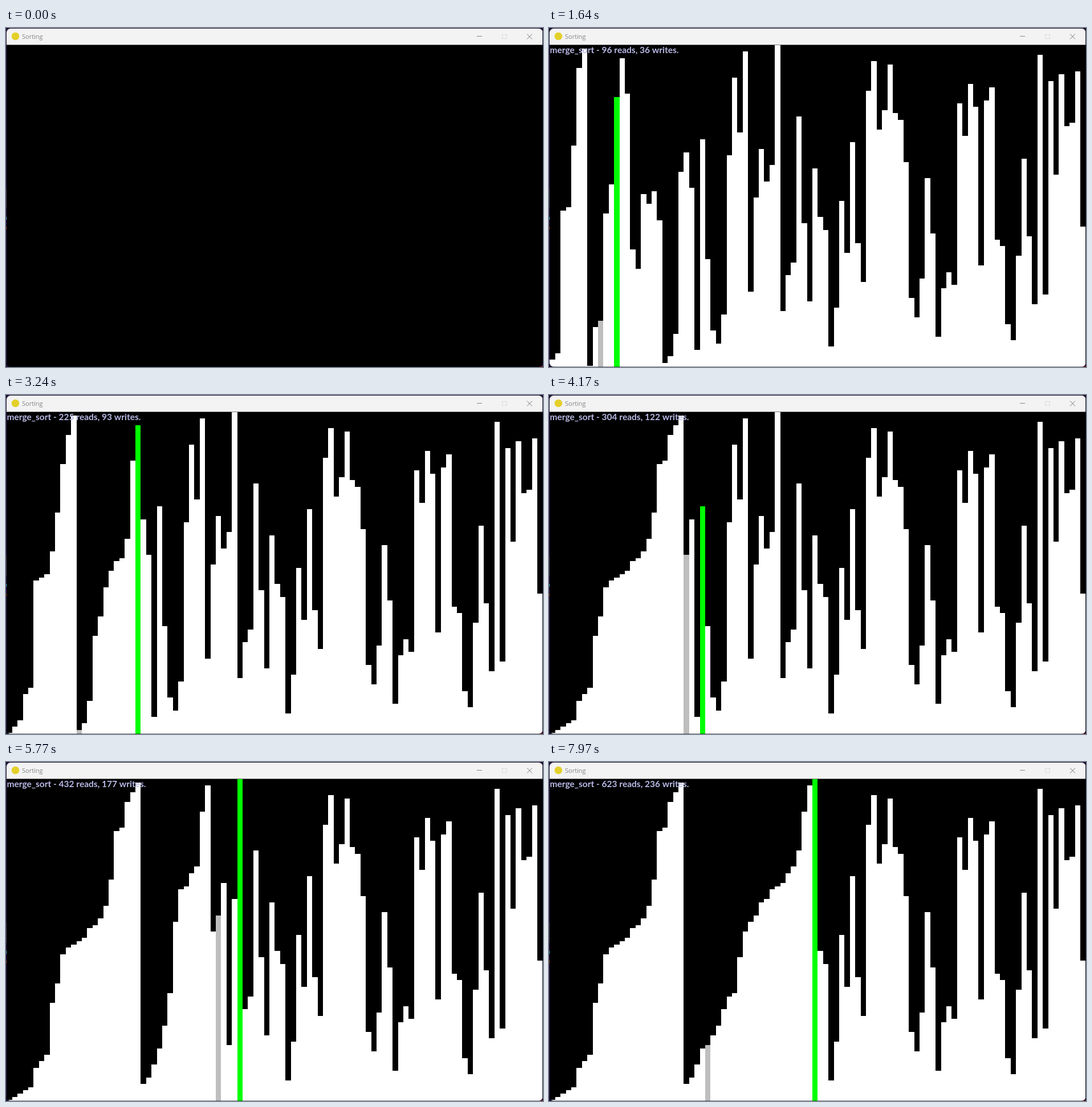
Animation of 942x594 px, one loop 8 s. Source, as an HTML page with a canvas:

```html
<!DOCTYPE html>
<html lang="en">
<head>
<meta charset="utf-8">
<title>Sorting</title>
<style>
  html, body { margin: 0; width: 100%; height: 100%; overflow: hidden; background: #1a1030; }
  canvas { display: block; }
</style>
</head>
<body>
<canvas id="stage" width="942" height="594"></canvas>
<script>
const ctx = document.getElementById('stage').getContext('2d');

const LOOP = 8000, START = 500, TICK = 200 / 3;
const BAR_WIDTH = 9.4, LEFT = 1.4, FLOOR = 592.4, UNIT = 5.68;

const initial = [
  68, 98, 48, 92, 4, 2, 49, 14, 0, 56, 47, 12, 83, 95, 84, 36, 30, 53, 50, 54,
  45, 1, 3, 10, 60, 66, 55, 5, 70, 33, 11, 7, 16, 65, 89, 72, 97, 23, 52, 67,
  57, 62, 99, 17, 28, 32, 77, 44, 20, 61, 46, 42, 6, 18, 51, 35, 69, 38, 26, 85,
  94, 73, 79, 93, 78, 76, 63, 21, 15, 27, 58, 41, 9, 24, 29, 25, 81, 71, 87, 80,
  31, 82, 86, 39, 37, 13, 8, 34, 64, 40, 19, 96, 22, 88, 59, 90, 74, 75, 91, 43
];

// Pace of the sort: [tick, array accesses so far]
const pace = [[0, 1], [6, 47], [27, 209], [55, 426], [68, 526], [92, 708], [112, 859]];

// Every read and write of the merge sort, in order
function recordSort(values) {
  const a = values.slice(), log = [];
  const read = i => { log.push({ index: i }); return a[i]; };
  const write = (i, value) => { log.push({ index: i, value }); a[i] = value; };

  function sort(lo, hi) {
    if (lo >= hi) return;
    const mid = (lo + hi) >> 1;
    sort(lo, mid);
    sort(mid + 1, hi);
    const merged = [];
    let i = lo, j = mid + 1;
    while (i <= mid && j <= hi) {
      merged.push(read(i) < read(j) ? read(i++) : read(j++));
    }
    while (i <= mid) merged.push(read(i++));
    while (j <= hi) merged.push(read(j++));
    merged.forEach((value, n) => write(lo + n, value));
  }

  sort(0, a.length - 1);
  return log;
}

const accesses = recordSort(initial);

function accessCount(tick) {
  const n = Math.max(1, pace.findIndex(([t]) => t >= tick));
  const [t0, c0] = pace[n - 1], [t1, c1] = pace[n];
  return Math.round(c0 + (c1 - c0) * (tick - t0) / (t1 - t0));
}

function stateAfter(count) {
  const state = { bars: initial.slice(), reads: 0, writes: 0, lastRead: -1, lastWrite: -1 };
  for (const { index, value } of accesses.slice(0, count)) {
    if (value === undefined) {
      state.reads++;
      state.lastRead = index;
    } else {
      state.writes++;
      state.lastWrite = index;
      state.bars[index] = value;
    }
  }
  return state;
}

function rect(color, x, y, w, h) {
  ctx.fillStyle = color;
  ctx.fillRect(x, y, w, h);
}

function text(string, x, y, font, color) {
  ctx.font = font;
  ctx.fillStyle = color;
  ctx.fillText(string, x, y);
}

function line(color, ...points) {
  ctx.strokeStyle = color;
  ctx.lineWidth = 1;
  ctx.beginPath();
  for (const [x1, y1, x2, y2] of points) {
    ctx.moveTo(x1, y1);
    ctx.lineTo(x2, y2);
  }
  ctx.stroke();
}

function drawDesktop() {
  rect('#1a1030', 0, 0, 942, 594);
  rect('#3b1d63', 0, 30, 1, 556);
  for (let y = 282; y < 318; y += 4) rect('#6a6a6a', 0, y, 1, 2);
  rect('#45b8d8', 0, 331, 1, 5);
  rect('#b0501c', 0, 348, 1, 4);
  rect('#5a1820', 934, 592, 8, 2);
}

function drawTitleBar() {
  rect('#f3f3f3', 1, 1, 940, 28.5);
  ctx.fillStyle = '#e3d02a';
  ctx.beginPath();
  ctx.arc(16.5, 14.5, 6.8, 0, Math.PI * 2);
  ctx.fill();
  text('Sorting', 28, 19, '11px "Open Sans", sans-serif', '#858585');
  line('#858585', [826, 14.5, 835, 14.5]);
  ctx.strokeStyle = '#dcdcdc';
  ctx.strokeRect(870.5, 11.5, 8, 7);
  line('#777', [914, 10.5, 923, 19.5], [923, 10.5, 914, 19.5]);
}

function drawBars({ bars, reads, writes, lastRead, lastWrite }) {
  bars.forEach((value, i) => {
    const x = Math.round(LEFT + i * BAR_WIDTH);
    const right = Math.round(LEFT + (i + 1) * BAR_WIDTH);
    const top = Math.round(FLOOR - value * UNIT);
    const color = i === lastWrite ? '#00ff00' : i === lastRead ? '#bebebe' : '#ffffff';
    rect(color, x, top, right - x, 594 - top);
  });
  text(`merge_sort - ${reads} reads, ${writes} writes.`, 1.5, 43.5,
    'bold 15.5px Lato, sans-serif', '#b9b9e6');
}

function draw(tick) {
  drawDesktop();
  ctx.save();
  ctx.beginPath();
  ctx.roundRect(1, 1, 940.5, 592.5, 7);
  ctx.clip();
  rect('#000', 1, 29, 941, 565);
  if (tick >= 0) drawBars(stateAfter(accessCount(tick)));
  drawTitleBar();
  ctx.restore();
}

const begin = performance.now();
let shown = null;

function frame() {
  const time = (performance.now() - begin) % LOOP;
  // Ticks fall on whole hundredths of a second, so allow for rounding
  const tick = time < START ? -1 : Math.min(112, Math.floor((time - START + 4) / TICK));
  if (tick !== shown) draw(shown = tick);
  requestAnimationFrame(frame);
}
frame();
</script>
</body>
</html>
```
